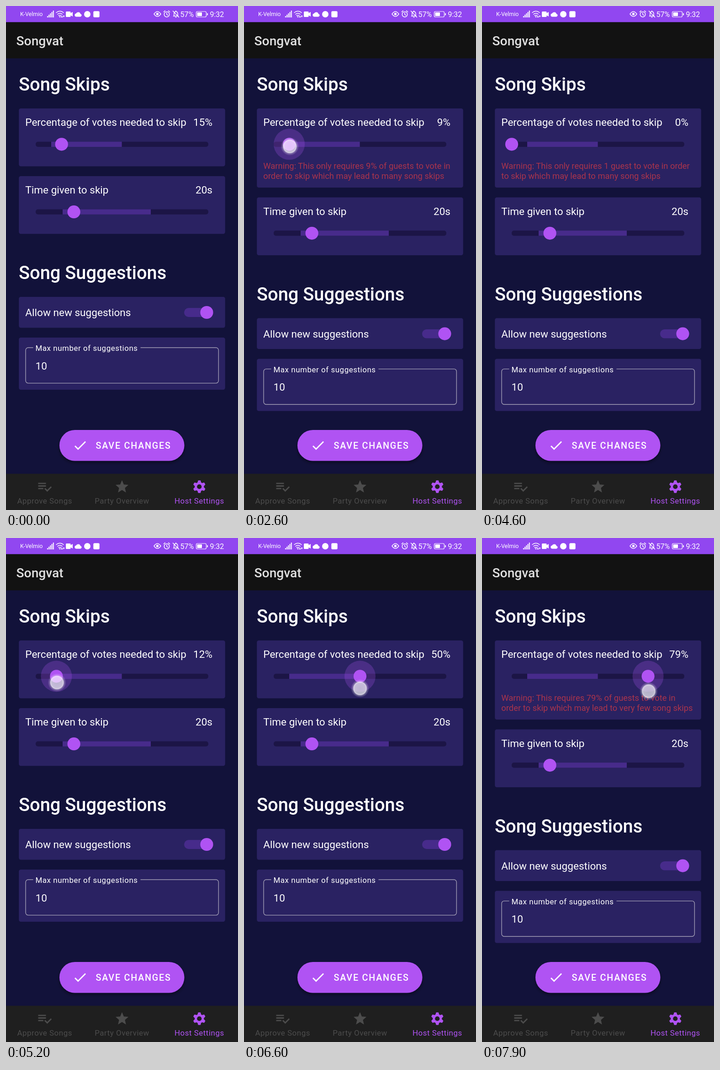
An HTML page that plays this animation: 508 px wide and 1102 px high, repeating every 8 s.

```html
<!DOCTYPE html>
<html lang="en">
<head>
<meta charset="utf-8">
<title>Host settings</title>
<style>
  html, body { margin: 0; width: 100%; height: 100%; overflow: hidden; background: #12123a; }
  svg { display: block; width: 508px; height: 1102px; font-family: Roboto, sans-serif; }
  text { fill: #fff; white-space: pre; }
  .status text { font-size: 16px; }
  .status .carrier { font-size: 12.5px; }
  .line { fill: none; stroke: #fff; stroke-width: 1.5; stroke-linecap: round; stroke-linejoin: round; }
  .title { font-size: 28.2px; font-weight: 500; fill: #e0e0e0; }
  .heading { font-size: 39.8px; font-weight: 500; }
  .body { font-size: 22.58px; }
  .warning { font-size: 18.4px; fill: #aa344c; }
  .label { font-size: 16.93px; letter-spacing: .55px; }
  .button { font-size: 19.76px; font-weight: 500; letter-spacing: 1.76px; }
  .nav text { font-size: 16.93px; letter-spacing: .52px; text-anchor: middle; fill: inherit; }
  .end { text-anchor: end; }
  .card { fill: #2a2262; }
  .track { fill: #1c1546; }
  .range { fill: #472b8b; }
  .accent { fill: #b053f3; }
</style>
</head>
<body>
<svg viewBox="0 0 508 1102">
  <defs>
    <radialGradient id="glow">
      <stop offset="0" stop-color="#fff" stop-opacity=".64"/>
      <stop offset=".55" stop-color="#fff" stop-opacity=".68"/>
      <stop offset=".7" stop-color="#fff" stop-opacity=".78"/>
      <stop offset=".78" stop-color="#fff" stop-opacity=".3"/>
      <stop offset="1" stop-color="#fff" stop-opacity="0"/>
    </radialGradient>
    <filter id="shadow" x="-10%" y="-20%" width="120%" height="150%">
      <feDropShadow dx="0" dy="4" stdDeviation="3.5" flood-color="#000" flood-opacity=".42"/>
    </filter>
    <path id="tooth" d="M-3.9-9-2.8-13.2Q-2.6-13.8-2-13.8H2Q2.6-13.8 2.8-13.2L3.9-9Z"/>
  </defs>

  <rect width="508" height="1102" fill="#12123a"/>

  <g class="status" fill="#fff">
    <rect width="508" height="35.5" fill="#9147f0"/>
    <text class="carrier" x="31" y="22.3">K-Velmio</text>
    <path d="M90 22h2v3h-2zM93.2 19h2v6h-2zM96.4 16h2v9h-2zM99.6 13h2v12h-2zM102.8 10h2v15h-2z"/>
    <path class="line" d="M110 14.5q8-6.5 16 0M112.8 18q5.2-4 10.4 0M115.3 21.2q2.7-2 5.4 0"/>
    <circle cx="118" cy="23.6" r="1.4"/>
    <path d="M122.5 21l2 4h-4zM126.5 25l-2-4h4z"/>
    <path d="M132.5 12h7.500q1.500 0 1.500 1.500v2l4.500-2.500v10l-4.500-2.500v2q0 1.500-1.500 1.500h-7.500q-1.500 0-1.500-1.500v-9q0-1.500 1.500-1.500z"/>
    <path d="M153.500 23.500a3.700 3.700 0 0 1 0-7.300a5.200 5.200 0 0 1 9.500 1a3.200 3.200 0 0 1 0 6.300z"/>
    <circle cx="178" cy="18" r="7"/>
    <rect x="191.300" y="11.300" width="13.400" height="13.400" rx="2.500"/>
    <path class="line" d="M324 17.500q7.500-10.500 15 0q-7.500 10.500-15 0z"/>
    <circle cx="331.500" cy="17.500" r="2.700"/>
    <g class="line">
      <circle cx="352" cy="18.300" r="5.700"/>
      <path d="M352 15v3.500l2.300 1.600M345.300 13l3-2.600M358.700 13l-3-2.600"/>
      <path d="M366.500 22h10.500M368 21.500v-5q.5-4 4-4.500q3.500.5 4 4.500v5M371 24.500h2M372 11v-.500M365.500 11l13 13.500"/>
      <rect x="416.500" y="12" width="22" height="12" rx="2.800" stroke-width="1.200"/>
    </g>
    <rect x="418.500" y="14" width="10.500" height="8" rx="1"/>
    <rect x="440" y="15.500" width="2" height="5" rx="1"/>
    <text x="381.500" y="23.600">57%</text>
    <text x="446.500" y="23.600">9:32</text>
  </g>

  <rect y="35.500" width="508" height="79" fill="#121212"/>
  <text class="title" x="22.600" y="85.500">Songvat</text>

  <text class="heading" x="28" y="185">Song Skips</text>
  <rect id="skipCard" class="card" x="28.200" y="224" width="451.600" height="126.500" rx="4.200"/>
  <text class="body" x="42.300" y="262">Percentage of votes needed to skip</text>
  <text id="percent" class="body end" x="452" y="262">15%</text>
  <g id="warning" class="warning">
    <text class="warning" x="42.300" y="356.300"></text>
    <text class="warning" x="42.300" y="377.800"></text>
  </g>
  <rect class="track" x="65" y="296.700" width="378" height="11.300" rx="5"/>
  <rect class="range" x="99" y="296.700" width="154.600" height="11.300"/>
  <circle id="halo" class="accent" cy="302.300" r="34"/>
  <circle id="thumb" class="accent" cy="302.300" r="14.100"/>

  <g id="lower">
    <rect class="card" x="28.200" y="372" width="451.600" height="126.300" rx="4.200"/>
    <text class="body" x="42.300" y="410">Time given to skip</text>
    <text class="body end" x="452" y="410">20s</text>
    <rect class="track" x="65" y="444.500" width="378" height="11.300" rx="5"/>
    <rect class="range" x="124" y="444.500" width="193" height="11.300"/>
    <circle class="accent" cx="148.600" cy="450.200" r="14.100"/>

    <text class="heading" x="28" y="597">Song Suggestions</text>
    <rect class="card" x="28.200" y="636" width="451.600" height="67.500" rx="4.200"/>
    <text class="body" x="42.300" y="678.300">Allow new suggestions</text>
    <rect class="range" x="390" y="660.300" width="62" height="19.600" rx="9.800"/>
    <circle class="accent" cx="439.500" cy="670" r="14.100"/>

    <rect class="card" x="28.200" y="725" width="451.600" height="114" rx="4.200"/>
    <path d="M59.500 747H48.600a5.600 5.600 0 0 0-5.600 5.600V819a5.600 5.600 0 0 0 5.600 5.600H459.800a5.600 5.600 0 0 0 5.600-5.600V752.600a5.600 5.600 0 0 0-5.600-5.600H294.500" fill="none" stroke="#a19db5" stroke-width="1.400"/>
    <text class="label" x="64.500" y="754.300">Max number of suggestions</text>
    <text class="body" x="64.500" y="794.800">10</text>
  </g>

  <rect class="accent" x="117" y="927" width="273.500" height="67.500" rx="33.750" filter="url(#shadow)"/>
  <path d="M151 962l6.800 6.800 16.200-16.200" fill="none" stroke="#fff" stroke-width="2.800"/>
  <text class="button" x="196.500" y="968.200">SAVE CHANGES</text>

  <rect y="1022.800" width="508" height="80" fill="#1f1f1f"/>
  <g class="nav" fill="#4c4c4c">
    <path transform="translate(67.700 1034) scale(1.411)" d="M14 10H2v2h12v-2zm0-4H2v2h12V6zM2 16h8v-2H2v2zm19.500-4.500L23 13l-6.990 7-4.510-4.500L13 14l3.010 3 5.490-5.500z"/>
    <text x="84.700" y="1088">Approve Songs</text>
    <path transform="translate(237.070 1034) scale(1.411)" d="M12 17.270L18.180 21l-1.640-7.030L22 9.240l-7.190-.61L12 2 9.190 8.630 2 9.240l5.460 4.730L5.820 21z"/>
    <text x="254" y="1088">Party Overview</text>
    <g class="accent">
      <g id="gear" transform="translate(423.300 1051)">
        <circle r="7.600" fill="none" stroke="#b053f3" stroke-width="5"/>
      </g>
      <text x="423.300" y="1088">Host Settings</text>
    </g>
  </g>

  <circle id="touch" r="20" fill="url(#glow)"/>
</svg>
<script>
const LOOP = 8000, STEP = 100;
const $ = id => document.getElementById(id);
const [lineOne, lineTwo] = $('warning').children;

// Each track is a list of [time, value] points.
const VALUE = [[2300, 15], [2600, 9], [3500, 0], [4800, 0], [5200, 12], [6100, 38], [7000, 59], [7900, 79]];
const TOUCH_Y = [[2300, 303], [2600, 307], [4000, 314], [4800, 309], [5200, 316], [6100, 330], [7000, 328], [7900, 335]];
const TOUCH = [[2200, 0], [2300, .6], [2400, 1], [4000, 1], [4300, 0], [4700, 0], [4800, .6], [4900, 1]];
const HALO = [[2200, 0], [2300, .4], [2500, 1], [3900, 1], [4100, .15], [4200, 0], [4700, 0], [4800, .4], [5000, 1]];

function sample(track, t) {
  const i = track.findIndex(point => point[0] > t);
  if (i === 0) return track[0][1];
  if (i < 0) return track[track.length - 1][1];
  const [t0, a] = track[i - 1], [t1, b] = track[i];
  return a + (b - a) * (t - t0) / (t1 - t0);
}

function set(id, attributes) {
  for (const name in attributes) $(id).setAttribute(name, attributes[name]);
}

const sliderX = percent => 65 + 3.78 * percent;

function warningText(percent) {
  if (percent === 0) return ['Warning: This only requires 1 guest to vote in order', 'to skip which may lead to many song skips'];
  if (percent < 10) return [`Warning: This only requires ${percent}% of guests to vote in`, 'order to skip which may lead to many song skips'];
  if (percent > 50) return [`Warning: This requires ${percent}% of guests to vote in`, 'order to skip which may lead to very few song skips'];
  return ['', ''];
}

function draw(t) {
  const value = sample(VALUE, t);
  const percent = Math.round(value);
  const halo = sample(HALO, t);
  const lines = warningText(percent);
  const shift = lines[0] ? 46.6 : 0;

  $('percent').textContent = percent + '%';
  [lineOne.textContent, lineTwo.textContent] = lines;
  set('skipCard', { height: 126.5 + shift });
  set('lower', { transform: `translate(0 ${shift})` });
  set('thumb', { cx: sliderX(percent) });
  set('halo', { cx: sliderX(percent), r: 14 + 20 * Math.sqrt(halo), opacity: .24 * halo });
  set('touch', { cx: sliderX(value) + 1.3, cy: sample(TOUCH_Y, t), opacity: sample(TOUCH, t) });
}

for (let angle = 0; angle < 360; angle += 60) {
  const tooth = document.createElementNS('http://www.w3.org/2000/svg', 'use');
  tooth.setAttribute('href', '#tooth');
  tooth.setAttribute('transform', `rotate(${angle})`);
  $('gear').append(tooth);
}

const start = performance.now();
function tick() {
  const t = (performance.now() - start) % LOOP;
  draw(Math.floor(t / STEP) * STEP);
  requestAnimationFrame(tick);
}
tick();
</script>
</body>
</html>
```
